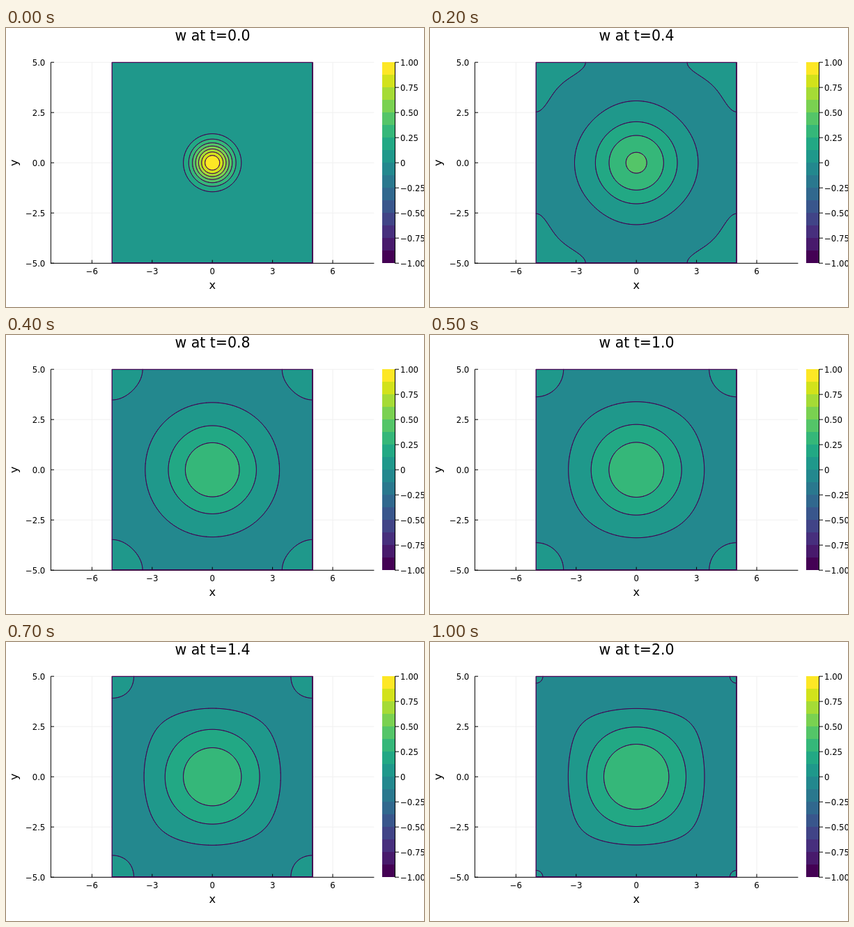
These frames come from a looping animation (600x400 px, 1050 ms). An HTML page with a canvas:

```html
<!DOCTYPE html>
<html lang="en">
<head>
<meta charset="utf-8">
<title>Contour plot of w</title>
<style>
  html, body { margin: 0; width: 100%; height: 100%; overflow: hidden; background: #fff; }
  canvas, svg { position: absolute; left: 0; top: 0; width: 600px; height: 400px; }
  text { font-family: "DejaVu Sans", Verdana, sans-serif; font-size: 11.7px; fill: #000; }
  .title { font-size: 20.5px; }
  .guide { font-size: 16.1px; }
</style>
</head>
<body>
<canvas id="plot" width="600" height="400"></canvas>
<svg id="labels" viewBox="0 0 600 400"></svg>
<script>
const COLORS = ("440154 481a6c 472f7d 414487 39568c 31688e 2a788e 23888e " +
  "1f988b 22a884 35b779 54c568 7ad151 a5db36 d2e21b fde725").split(" ");
const RGB = COLORS.map(h => [0, 2, 4].map(i => parseInt(h.slice(i, i + 2), 16)));
const LINE = "#440154";
const STEP_MS = 50, STEPS = 21;
const CX = 296.2, CY = 193.2, UNIT = 28.8;
const LEFT = 152, TOP = 49, SIZE = 288;
const CELLS = 144, MODES = 6;

const ctx = document.getElementById("plot").getContext("2d");
const svg = document.getElementById("labels");

// Static axes and labels

function text(str, x, y, anchor = "middle", cls = "") {
  const el = document.createElementNS("http://www.w3.org/2000/svg", "text");
  el.setAttribute("x", x);
  el.setAttribute("y", y);
  el.setAttribute("text-anchor", anchor);
  if (cls) el.setAttribute("class", cls);
  el.textContent = str;
  svg.append(el);
  return el;
}

function line(x1, y1, x2, y2, color = "#000", width = 1) {
  ctx.strokeStyle = color;
  ctx.lineWidth = width;
  ctx.beginPath();
  ctx.moveTo(x1, y1);
  ctx.lineTo(x2, y2);
  ctx.stroke();
}

const minus = s => s.replace("-", "\u2212");
const xTicks = [-6, -3, 0, 3, 6], yTicks = [-5, -2.5, 0, 2.5, 5];
const px = x => CX + x * UNIT, py = y => CY - y * UNIT;

const title = text("", 296.5, 18, "middle", "title");
text("x", 296.2, 374, "middle", "guide");
text("y", 0, 0, "middle", "guide").setAttribute("transform", "translate(16.5 193.2) rotate(-90)");
for (const x of xTicks) text(minus(String(x)), px(x), 353);
for (const y of yTicks) text(minus(y.toFixed(1)), 56.3, py(y) + 4.3, "end");
for (let i = -4; i <= 4; i++) {
  text(i ? minus((i / 4).toFixed(2)) : "0", 566, CY - i * 36 + 4.3, "start");
}

function drawGrid() {
  for (const x of xTicks) line(px(x), 49.2, px(x), 337.2, "#f0f0f0");
  for (const y of yTicks) line(64.4, py(y), 528.4, py(y), "#f0f0f0");
}

function drawAxes() {
  line(64.4, 49.2, 64.4, 337.7);
  line(63.9, 337.3, 528.4, 337.3);
  for (const x of xTicks) line(px(x), 337.2, px(x), 332.6);
  for (const y of yTicks) line(64.4, py(y), 69, py(y));
}

function drawColorbar() {
  COLORS.forEach((c, i) => {
    ctx.fillStyle = "#" + c;
    ctx.fillRect(540, 319 - i * 18, 18, 18);
  });
  line(558.5, 49, 558.5, 337.7);
  for (let i = -4; i <= 4; i++) line(558.5, CY - i * 36, 564, CY - i * 36);
}

// w_t = -lap(w) - lap(lap(w)) on a periodic square, solved by cosine modes

const K = 2 * Math.PI / 10;

function coefficients(t) {
  const c = [];
  for (let m = 0; m < MODES; m++) {
    c.push([]);
    for (let n = 0; n < MODES; n++) {
      const q = K * K * (m * m + n * n);
      const weight = (m ? 2 : 1) * (n ? 2 : 1);
      c[m].push(Math.PI / 100 * weight * Math.exp(-0.256 * q + (q - q * q) * t));
    }
  }
  return c;
}

const range = (n, fn) => Array.from({ length: n }, (_, i) => fn(i));

function makeGrid(xs) {
  return { xs, cos: xs.map(x => range(MODES, m => Math.cos(m * K * x))) };
}

const pixels = makeGrid(range(SIZE, i => (LEFT + i + 0.5 - CX) / UNIT));
const nodes = makeGrid(range(CELLS + 1, i => -5 + 10 * i / CELLS));

function sample(grid, t) {
  const { xs, cos } = grid, n = xs.length, out = new Float64Array(n * n);
  const c = coefficients(t);
  for (let j = 0; j < n; j++) {
    const row = c.map(r => r.reduce((s, v, k) => s + v * cos[j][k], 0));
    for (let i = 0; i < n; i++) {
      let w = 0;
      if (t === 0) {
        w = Math.exp(-(xs[i] * xs[i] + xs[j] * xs[j]));
      } else {
        for (let m = 0; m < MODES; m++) w += row[m] * cos[i][m];
      }
      out[j * n + i] = w;
    }
  }
  return out;
}

function drawBands(t) {
  const img = ctx.createImageData(SIZE, SIZE);
  sample(pixels, t).forEach((w, i) => {
    const band = Math.max(0, Math.min(15, Math.floor(w * 8) + 8));
    img.data.set(RGB[band], i * 4);
    img.data[i * 4 + 3] = 255;
  });
  ctx.putImageData(img, LEFT, TOP);
}

function drawContours(t) {
  const w = sample(nodes, t), n = CELLS + 1, size = SIZE / CELLS;
  const corners = [[0, 0], [1, 0], [1, 1], [0, 1]];
  ctx.beginPath();
  for (let j = 0; j < CELLS; j++) {
    for (let i = 0; i < CELLS; i++) {
      const v = corners.map(([a, b]) => 8 * w[(j + b) * n + i + a]);
      const low = Math.floor(Math.min(...v)), high = Math.floor(Math.max(...v));
      for (let level = low + 1; level <= high && level < 8; level++) {
        const hits = [];
        for (let e = 0; e < 4; e++) {
          const f = (e + 1) % 4;
          if ((v[e] < level) === (v[f] < level)) continue;
          const s = (level - v[e]) / (v[f] - v[e]);
          const [a, b] = corners[e], [p, q] = corners[f];
          hits.push([i + a + s * (p - a), j + b + s * (q - b)]);
        }
        hits.forEach(([x, y], h) => {
          const X = px(-5) + x * size, Y = py(5) + y * size;
          if (h % 2) ctx.lineTo(X, Y); else ctx.moveTo(X, Y);
        });
      }
    }
  }
  ctx.strokeStyle = LINE;
  ctx.lineWidth = 1;
  ctx.lineCap = "round";
  ctx.stroke();
  ctx.lineCap = "butt";
}

function drawBorder() {
  line(152, 49.4, 440.5, 49.4, LINE, 1.1);
  line(152.2, 49, 152.2, 337.5, LINE, 1.3);
  line(440, 49, 440, 337.5, LINE, 2);
  line(152, 336.8, 440.5, 336.8, LINE, 1.6);
}

function draw(step) {
  const t = step / 10;
  ctx.fillStyle = "#fff";
  ctx.fillRect(0, 0, 600, 400);
  drawGrid();
  drawBands(t);
  drawContours(t);
  drawAxes();
  drawBorder();
  drawColorbar();
  title.textContent = "w at t=" + t.toFixed(1);
}

const start = performance.now();
let shown = -1;

function tick() {
  const step = Math.floor((performance.now() - start) / STEP_MS) % STEPS;
  if (step !== shown) draw(shown = step);
  requestAnimationFrame(tick);
}
tick();
</script>
</body>
</html>
```
